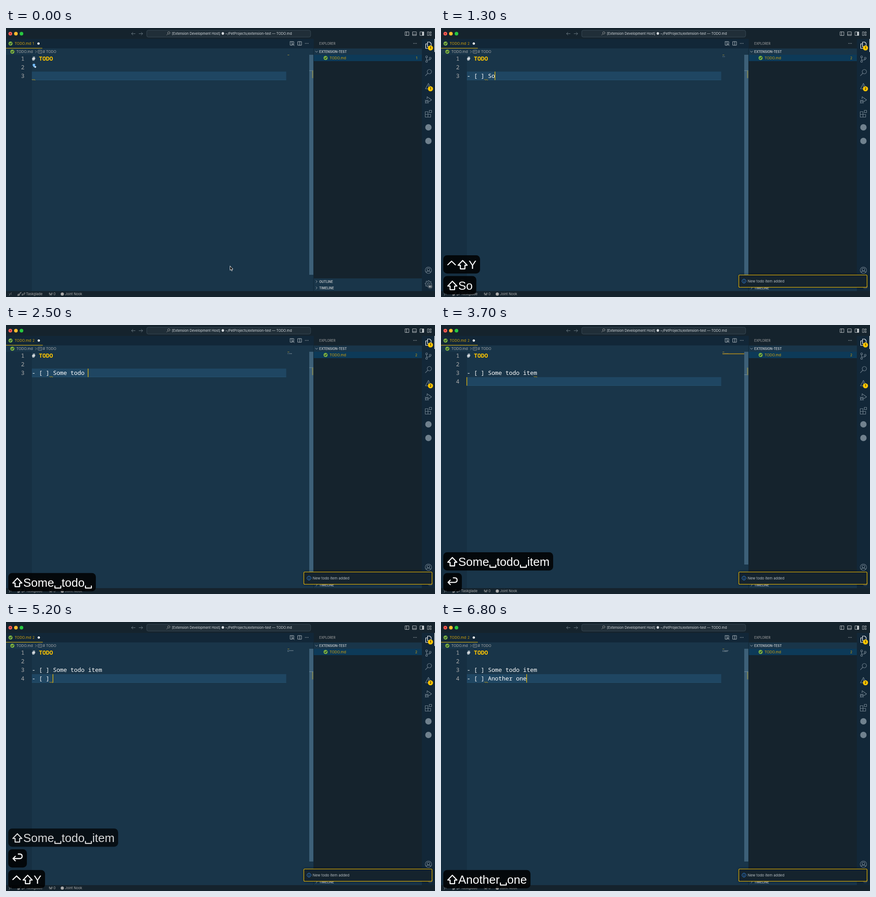
Animation of 945 by 593 pixels, one loop 7.12 s. Source, as an HTML page with a canvas:

```html
<!DOCTYPE html>
<html lang="en">
<head>
<meta charset="utf-8">
<title>Todo extension demo</title>
<style>
html, body { margin: 0; width: 100%; height: 100%; overflow: hidden; background: #15232d; }
canvas { display: block; width: 100vw; height: 100vh; }
</style>
</head>
<body>
<canvas id="stage"></canvas>
<script>
const W = 945, H = 593, LOOP = 7120, TICK = 100;
const UI = 'Inter, "Open Sans", sans-serif';
const MONO = '"Noto Sans Mono", "DejaVu Sans Mono", monospace';
const KEYS = '"Liberation Sans", Arial, sans-serif';
const YELLOW = '#ffc600', WARN = '#d6a40a', GREY = '#aaaaaa', DIM = '#70818e';
const DARK = '#15232d', NAVY = '#122738', BLUE = '#193549';
const CHAR = 7.75, LEFT = 57, ROW = 18.85;

const canvas = document.getElementById('stage');
const g = canvas.getContext('2d');
const scale = window.devicePixelRatio || 1;
canvas.width = W * scale;
canvas.height = H * scale;

// ---- timeline ----
const typing = (text, times) => ({
  first: times[0],
  last: times[times.length - 1],
  at: t => text.slice(0, times.filter(k => k <= t).length)
});
const item1 = typing('Some todo item',
  [1100, 1300, 1400, 1500, 1600, 1900, 2000, 2200, 2300, 2500, 2800, 2900, 3100, 3200]);
const item2 = typing('Another one',
  [5300, 5400, 5500, 5600, 5700, 5800, 5900, 6200, 6400, 6500, 6600]);
const press = (time, keys) => ({ first: time, last: time, keys: () => keys });
const shifted = item => ({ ...item, keys: t => '⇧' + item.at(t) });
const ENTER = 3700, ADD1 = 100, ADD2 = 4600;
const strokes = [
  press(ADD1, '^⇧Y'), shifted(item1), press(ENTER, '↵'),
  press(ADD2, '^⇧Y'), shifted(item2)
];

// Value of the latest [time, value] pair that has been reached.
const step = (t, ...pairs) => pairs.filter(p => p[0] <= t).pop()[1];
const fileCount = t => step(t, [0, 1], [700, 2], [3800, 1], [4200, 0], [5100, 2]);
const badgeCount = t => step(t, [0, 1], [800, 2], [ENTER, 1], [4300, 0], [5200, 2]);
// Row, column and length in characters.
const squiggle = t => step(t, [0, [3, 0, 1]], [600, [3, 5, 1]], [ENTER, [3, 19, 1]],
  [4200, null], [5100, [4, 5, 1]], [5400, [4, 5, 1.8]], [5900, [4, 5, 1]]);
const clamp = v => Math.min(1, Math.max(0, v));

// ---- drawing helpers ----
function rect(x, y, w, h, color) {
  g.fillStyle = color;
  g.fillRect(x, y, w, h);
}
function box(x, y, w, h, r, fill, line, lw = 1) {
  g.beginPath();
  g.roundRect(x, y, w, h, r);
  if (fill) { g.fillStyle = fill; g.fill(); }
  if (line) { g.strokeStyle = line; g.lineWidth = lw; g.stroke(); }
}
function dot(x, y, r, color) {
  g.beginPath();
  g.arc(x, y, r, 0, 7);
  g.fillStyle = color;
  g.fill();
}
function label(s, x, cy, size, color, { weight = 400, font = UI, align = 'left' } = {}) {
  g.font = `${weight} ${size}px ${font}`;
  g.textAlign = align;
  g.fillStyle = color;
  g.fillText(s, x, cy + size * 0.36);
}
function icon(path, x, y, color = GREY, lw = 0.9, k = 1) {
  g.save();
  g.translate(x, y);
  g.scale(k, k);
  g.strokeStyle = color;
  g.lineWidth = lw / k;
  g.lineJoin = g.lineCap = 'round';
  g.stroke(new Path2D(path));
  g.restore();
}
function check(x, y) {
  dot(x, y, 4.5, '#7cb342');
  icon('M-2 .1L-.6 1.6L2.2-1.5', x, y, DARK, 1.2);
}
function badge(n, y) {
  dot(935, y, 5.6, YELLOW);
  label(n, 935, y, 6, '#000', { weight: 600, align: 'center' });
}

const RING = r => `M${r} 0A${r} ${r} 0 1 1-${r} 0A${r} ${r} 0 1 1 ${r} 0`;
const ICON = {
  back: 'M4 0H-4M-1-3L-4 0L-1 3',
  forward: 'M-4 0H4M1-3L4 0L1 3',
  search: 'M-1.6 1.6L-6 6M6.2-2A4.3 4.3 0 1 1-2.4-2A4.3 4.3 0 1 1 6.2-2',
  frame: 'M-4-4H4V4H-4Z',
  files: 'M-2-7H3L6-4V3H-2ZM-2-3H-6V7H2V3',
  branch: 'M-2-5A2 2 0 1 1-6-5A2 2 0 1 1-2-5M-2 5A2 2 0 1 1-6 5A2 2 0 1 1-2 5M6-2A2 2 0 1 1 2-2A2 2 0 1 1 6-2M-4-3V3M4 0Q4 2 1 2H-2Q-4 2-4 3',
  alert: 'M0-6L6.5 6H-6.5ZM0-2V2M0 4V4.2',
  debug: 'M-3-2V-7L7 0L0 4.5M-1 4A2.6 3 0 1 1-6.2 4A2.6 3 0 1 1-1 4M-6.2 4H-7.5M-1 4H.5M-6 1.5L-7.2.3M-1.2 1.5L0 .3M-6 6.2L-7 7.3M-1.2 6.2L0 7.3M-6 2.8H-1.2',
  blocks: 'M-7-4H-1V2H5V8H-7ZM-7 2H-1V8M2-7H7V-2H2Z',
  user: RING(7) + 'M3-1.5A3 3 0 1 1-3-1.5A3 3 0 1 1 3-1.5M-5 5Q-4 2 0 2Q4 2 5 5',
  rocket: 'M-1 1Q0-3 4-4Q3 0-1 2ZM-1 0L-3 0L-4 2L-2 2M0 1V3L-2 4V2M-3.6 3L-4 4',
  link: 'M-1 0L1-2L3-3L3 0L1 1M-1 0L-3 0L-3 3L-1 2L1 1',
  tower: 'M0 0L-2 4M0 0L2 4M-1 2H1M-2-2Q-3 0-2 1M2-2Q3 0 2 1M-3.4-3Q-5 0-3.4 2M3.4-3Q5 0 3.4 2',
  remote: 'M-2.6-1L-.5 1L-2.6 3M2.6-3L.5-1L2.6 1',
  down: 'M-2.5-1.2L0 1.3L2.5-1.2',
  right: 'M-1.2-2.5L1.3 0L-1.2 2.5'
};
function more(x, y) {
  for (const d of [-3, 0, 3]) dot(x + d, y, 0.75, '#c0c6ca');
}

// ---- window parts ----
function titleBar() {
  rect(0, 0, W, 24, DARK);
  ['#ff5f57', '#febc2e', '#28c840'].forEach((c, i) => dot(9.5 + i * 12.3, 12.5, 4, c));
  dot(9.5, 12.5, 1.2, '#7a1510');
  icon(ICON.back, 280.5, 12.5, '#718089');
  icon(ICON.forward, 297, 12.5, '#718089');
  box(310, 5, 361, 15, 3.5, '#202e38', '#41525e', 0.8);
  icon(ICON.search, 357.5, 12, GREY, 0.8, 0.6);
  label('[Extension Development Host] ● ~/PetProjects/extension-test — TODO.md', 497.5, 12.5, 7.45,
    '#d5dade', { align: 'center' });
  const light = '#c4cacd';
  icon(ICON.frame + 'M-1-4V4', 883.5, 12.5, light);
  icon(ICON.frame + 'M-4 1.5H4', 899.9, 12.5, light);
  icon(ICON.frame, 916.3, 12.5, light);
  rect(916.5, 8.5, 4, 8, light);
  icon('M-4-4H-1V4H-4ZM1.5-4H4V-1H1.5ZM1.5 1.5H4V4H1.5Z', 932.7, 12.5, light, 0.8);
}

function tabs(t) {
  const n = fileCount(t), w = n ? 79 + n : 73.5;
  rect(0, 24, 677, 21, NAVY);
  rect(0, 45, 677, 14, BLUE);
  rect(0, 44.1, w, 0.9, YELLOW);
  check(10, 34.3);
  label('TODO.md', 19, 34.4, 7.9, n ? WARN : '#ffffff');
  if (n) label(n, 58.5, 34.4, 7.4, WARN);
  dot(n ? 71 + n * 0.6 : 65, 34.3, 2.5, '#fff');

  icon('M-4-4H4V0M-4-4V4H0M0-4V4M4 2A1.5 1.5 0 1 1 1 2A1.5 1.5 0 1 1 4 2M3.6 3.4L5 5', 630, 34, '#b9c2c8');
  icon(ICON.frame + 'M0-4V4', 647, 34, '#b9c2c8');
  more(662.5, 34);

  check(14, 52.3);
  label('TODO.md', 22.8, 52.4, 7.9, GREY);
  icon(ICON.right, 66, 52.3, GREY, 0.8);
  box(70.5, 49, 8.5, 6.5, 1, null, GREY, 0.8);
  label('abc', 74.7, 52.1, 3, GREY, { align: 'center' });
  label('# TODO', 81, 52.4, 7.9, GREY);
}

const rowY = n => 67.7 + (n - 1) * ROW;

function wave(row, col, len) {
  const x0 = LEFT + col * CHAR, y = rowY(row) + 8.7;
  g.beginPath();
  for (let x = 0; x <= len * CHAR; x += 0.5) g.lineTo(x0 + x, y - Math.sin(x * 1.7) * 0.9);
  g.strokeStyle = WARN;
  g.lineWidth = 1;
  g.stroke();
}

function editor(t) {
  const rows = ['# TODO', '', t >= ADD1 ? '- [ ] ' + item1.at(t) : ''];
  if (t >= ENTER) rows.push(t >= ADD2 ? '- [ ] ' + item2.at(t) : '');
  const cur = rows.length, top = rowY(cur) - 9.3;

  rect(0, 59, 677, 521, BLUE);
  rect(0, 59, LEFT, 521, '#162f42');
  rect(LEFT, top, 560.3, ROW, '#1f4662');
  rect(LEFT, top + ROW - 0.7, 560.3, 0.7, '#285878');

  rows.forEach((s, i) => {
    const y = rowY(i + 1);
    label(i + 1, 40.7, y, 12.9, GREY, { font: MONO, align: 'right' });
    if (i) label(s, LEFT, y, 12.9, '#fff', { font: MONO });
    else {
      label('#', LEFT, y, 12.9, '#fff', { font: MONO, weight: 700 });
      label('TODO', LEFT + 2 * CHAR, y, 12.9, YELLOW, { font: MONO, weight: 700 });
    }
    // minimap
    [...s].forEach((c, k) => {
      if (c !== ' ') rect(620 + k * 0.65, 59 + i * 1.8, 0.65, 1, i ? '#a3b1ba' : '#c9ab35');
    });
  });
  if (t >= ENTER && t < 4200) rect(620, 62.6, 48, 1.8, '#a8861f');

  if (t < 900) {
    dot(61.5, 81.5, 2.8, '#75beff');
    rect(60.3, 83.5, 2.4, 2.6, '#75beff');
    dot(64.5, 85.8, 2.1, '#c5dff2');
  }
  const s = squiggle(t);
  if (s) wave(...s);
  if (t >= ADD1) rect(LEFT + rows[cur - 1].length * CHAR - 0.7, top, 1.2, ROW, YELLOW);

  // scrollbar and overview marks
  const late = t >= ENTER;
  rect(668, 59, 9, late ? 469 : 485, '#3d6078');
  rect(668, late ? 109 : 93.5, 9, 1, '#718c9b');
  if (s) rect(674, s[0] === 3 ? 94 : 110, 3, 16.5, '#717c5c');
}

function section(name, y, open) {
  rect(678, y - 7, 238, 14, BLUE);
  icon(open ? ICON.down : ICON.right, 684, y, '#c0c6ca', 0.8);
  label(name, 690, y + 0.1, 6.9, '#b4babe', { weight: 700 });
}

function sidebar(t) {
  const n = fileCount(t), color = n ? WARN : GREY;
  rect(677, 24, 239, 556, DARK);
  rect(677, 24, 0.8, 556, '#10293a');
  label('EXPLORER', 690, 34.3, 7, GREY);
  more(901, 34);
  section('EXTENSION-TEST', 52.2, true);
  rect(678, 59, 238, 14, '#0d3a58');
  check(704, 66);
  label('TODO.md', 712.8, 66.1, 7.9, color);
  if (n) label(n, 906, 66.1, 7.4, color, { align: 'right' });
  section('OUTLINE', 559, false);
  section('TIMELINE', 573, false);
}

function activityBar(t) {
  const x = 930.5, n = badgeCount(t);
  rect(916, 24, 29, 556, NAVY);
  rect(943.8, 24, 1.2, 29, '#fff');
  icon(ICON.files, x, 38, '#fff', 1.1);
  badge(1, 44);
  icon(ICON.branch, x, 68.5, DIM, 1.1);
  icon(ICON.search, x, 98.5, DIM, 1.1, 1.1);
  icon(ICON.alert, x, 128, DIM, 1.1);
  if (n) badge(n, 134);
  icon(ICON.debug, x, 158.5, DIM, 1.1);
  icon(ICON.blocks, x, 188.5, DIM, 1.1);
  dot(x, 219, 7, DIM);
  dot(x, 249, 7, DIM);
  icon(ICON.user, x, 534, DIM, 1.1);

  let gear = '';
  for (let i = 0; i < 32; i++) {
    const a = i * Math.PI / 16, r = i % 4 < 2 ? 7.3 : 5.4;
    gear += `${i ? 'L' : 'M'}${r * Math.cos(a)} ${r * Math.sin(a)}`;
  }
  icon(gear + 'Z' + RING(2.2), x, 564, DIM, 1.1);
  dot(934.5, 570, 5.6, '#33434f');
  label('SC', 934.5, 570, 5.2, '#fff', { weight: 700, align: 'center' });
}

function statusBar() {
  rect(0, 580, W, 13, DARK);
  icon(ICON.remote, 9.5, 586.5, GREY, 0.8);
  icon(ICON.rocket, 29.5, 586.5, GREY, 0.8);
  icon(ICON.link, 38.5, 586.5, GREY, 0.8);
  label('Taskglade', 44, 586.4, 7.6, GREY);
  icon(ICON.tower, 98.5, 586, GREY, 0.8, 0.85);
  label('0', 104.5, 586.4, 7.4, GREY);
  dot(124, 586.5, 3.5, GREY);
  label('Joint Nook', 130, 586.4, 7.4, GREY);
}

function toast(t) {
  const start = t >= ADD2 ? ADD2 : t < 3900 ? ADD1 : Infinity;
  const p = clamp((t - start - 100) / 300);
  if (!p) return;
  const ease = 1 - (1 - p) ** 2;
  g.save();
  g.beginPath();
  g.rect(640, 530, 305, 63);
  g.clip();
  g.globalAlpha = ease;
  g.translate(0, (1 - ease) * 28);
  g.shadowColor = 'rgba(0,0,0,.4)';
  g.shadowBlur = 6 * scale;
  box(656, 544.5, 282.5, 27, 2, DARK);
  g.shadowColor = 'transparent';
  box(656, 544.5, 282.5, 27, 2, null, YELLOW, 1.1);
  icon(RING(4.3) + 'M0-.4V2.2M0-2.2V-2', 667.5, 558, '#3794ff', 0.9);
  label('New todo item added', 675.5, 558.2, 8, '#b5bcc0');
  g.restore();
}

// ---- keystroke overlay: advance width and outline of the drawn keys ----
const KEY = {
  '^': [22.7, 'M2 0L10.3-8L18.6 0'],
  '⇧': [25, 'M12-9.5L22 1H17V9H7V1H2Z'],
  '↵': [25, 'M14-10.5H17.5Q22.5-10.5 22.5-5.5Q22.5-.5 17.5-.5H2.5M7.5-5.5L2.5-.5L7.5 4.5'],
  ' ': [16.7, 'M1.8 7.5V12H14.8V7.5']
};
const keyWidth = c => KEY[c] ? KEY[c][0] : g.measureText(c).width;

function keycaps(t) {
  const live = strokes.filter(s => s.first <= t);
  live.forEach((s, i) => {
    const alpha = 1 - clamp((t - s.last - 1960) / 240);
    if (!alpha) return;
    const y = 546.8 - (live.length - 1 - i) * 45.8;
    const keys = [...s.keys(t)];
    g.save();
    g.globalAlpha = alpha;
    g.font = `26px ${KEYS}`;
    g.textAlign = 'left';
    const w = keys.reduce((sum, c) => sum + keyWidth(c), 16);
    box(5, y, w, 40.2, 8.5, 'rgba(0,0,0,.85)');
    let x = 13;
    for (const c of keys) {
      g.fillStyle = '#fff';
      if (KEY[c]) icon(KEY[c][1], x, y + 21, '#fff', 2.3);
      else g.fillText(c, x, y + 30);
      x += keyWidth(c);
    }
    g.restore();
  });
}

function pointer(t) {
  if (t >= ADD1) return;
  const p = new Path2D('M493.5 524.5V534L495.6 532.2L497.1 535.6L498.6 534.9L497.2 531.6H500Z');
  g.fillStyle = '#000';
  g.fill(p);
  g.strokeStyle = '#fff';
  g.lineWidth = 0.9;
  g.stroke(p);
}

function draw(t) {
  g.setTransform(scale, 0, 0, scale, 0, 0);
  titleBar();
  tabs(t);
  editor(t);
  sidebar(t);
  activityBar(t);
  statusBar();
  toast(t);
  keycaps(t);
  pointer(t);
}

const begin = performance.now();
function tick() {
  const t = (performance.now() - begin) % LOOP;
  draw(Math.floor(t / TICK) * TICK);
  requestAnimationFrame(tick);
}
tick();
</script>
</body>
</html>
```
